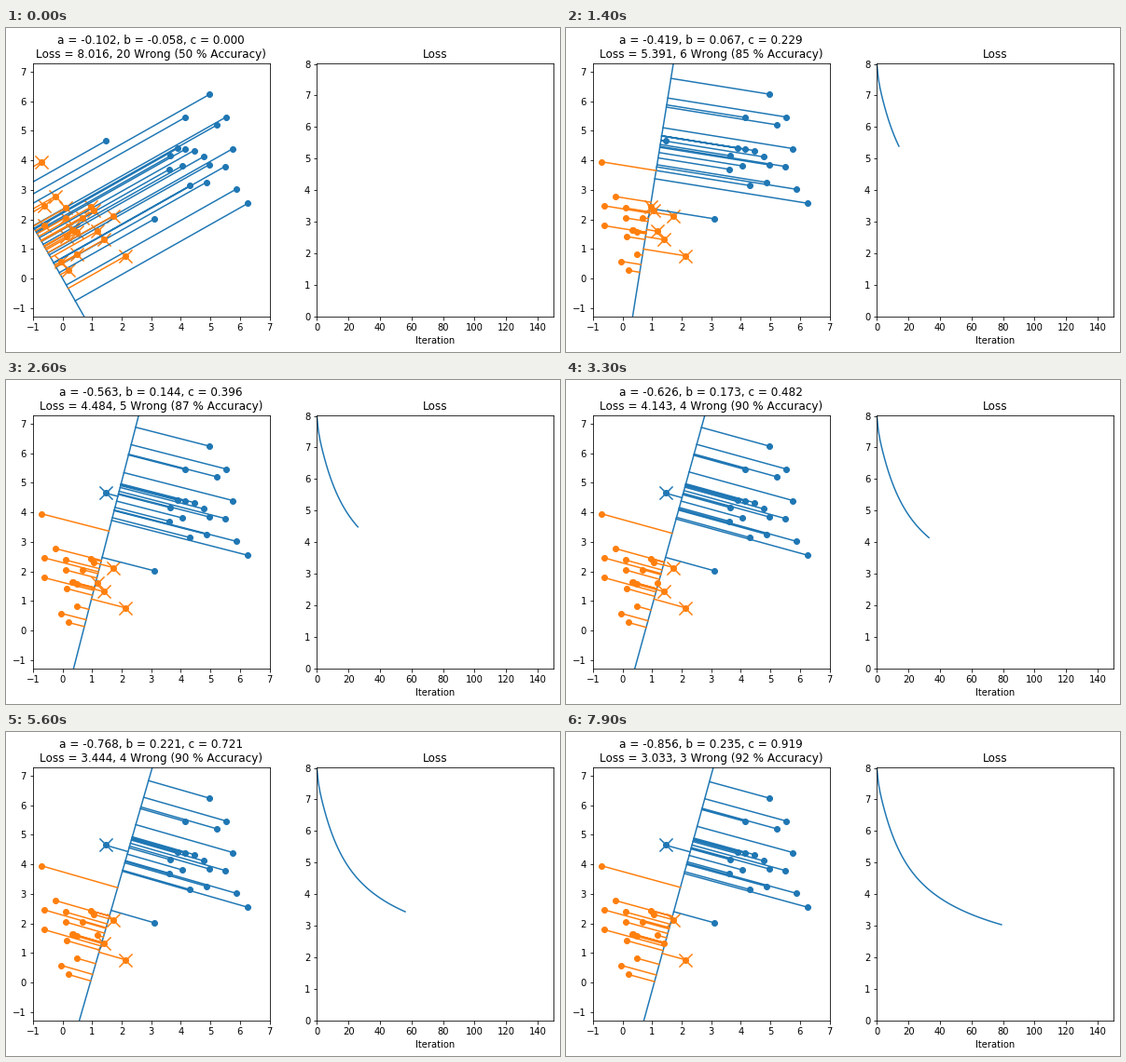
These frames come from a looping animation (594x348 px, 8 s). A matplotlib script:

```python
import numpy as np
import matplotlib.pyplot as plt
from matplotlib.animation import FuncAnimation

W, H, DPI = 594, 348, 72
STEPS, RATE, N = 80, 0.005, 20

plt.rcParams.update({"font.family": "DejaVu Sans", "font.size": 10,
                     "text.kerning_factor": 6})

rng = np.random.RandomState(0)
blue = rng.randn(N, 2) + 4
orange = rng.randn(N, 2) + [1, 2]


def train():
    """Gradient descent on the squared error of a sigmoid unit."""
    X = np.column_stack([np.vstack([blue, orange]), np.ones(2 * N)])
    y = np.repeat([0.0, 1.0], N)
    predict = lambda w: 1 / (1 + np.exp(-X @ w))
    w, states = np.zeros(3), []
    for _ in range(STEPS):
        s = predict(w)
        w = w - RATE * X.T @ (2 * (s - y) * s * (1 - s))
        states.append([*w, np.sum((predict(w) - y) ** 2)])
    return np.array(states)


states = train()
losses = states[:, 3]

fig = plt.figure(figsize=(W / DPI, H / DPI), dpi=DPI, facecolor="white")
AX_W, AX_H, LEFT, BOTTOM = 253.64, 271.8, 28.92, 38.2


def add_axes(left):
    return fig.add_axes([left / W, BOTTOM / H, AX_W / W, AX_H / H])


ax = add_axes(LEFT)
half = 4 * AX_H / AX_W
ax.set(xlim=(-1, 7), ylim=(3 - half, 3 + half),
       xticks=range(-1, 8), yticks=range(-1, 8))
title = ax.set_title("")

ax_loss = add_axes(LEFT + 1.2 * AX_W)
ax_loss.set(xlim=(0, 150), ylim=(0, losses[0]), xticks=range(0, 150, 20),
            yticks=range(9), xlabel="Iteration", title="Loss")
curve, = ax_loss.plot([], [], "C0")

border, = ax.plot([], [], "C0")


class Group:
    """Points of one class, their perpendiculars and error crosses."""

    def __init__(self, pts, color, sign):
        self.pts, self.sign = pts, sign
        self.legs, = ax.plot([], [], color=color)
        ax.plot(*pts.T, "o", color=color)
        self.cross = ax.scatter(*pts.T, s=200, marker="x", color=color)

    def update(self, n, c):
        z = self.pts @ n + c
        feet = self.pts - np.outer(z, n) / (n @ n)
        gap = np.full_like(feet, np.nan)
        self.legs.set_data(*np.stack([self.pts, feet, gap], 1).reshape(-1, 2).T)
        wrong = z * self.sign < 0
        self.cross.set_offsets(self.pts[wrong])
        return wrong.sum()


groups = [Group(blue, "C0", -1), Group(orange, "C1", 1)]
ax.set(xlim=(-1, 7), ylim=(3 - half, 3 + half))


def update(i):
    a, b, c, loss = states[i]
    n = np.array([a, b])
    along = np.array([-b, a]) / np.hypot(a, b)
    base = -c * n / (n @ n)
    border.set_data(*np.array([base - 20 * along, base + 20 * along]).T)
    wrong = sum(g.update(n, c) for g in groups)
    accuracy = 100 * (2 * N - wrong) // (2 * N)
    title.set_text(f"a = {a:.3f}, b = {b:.3f}, c = {c:.3f}\n"
                   f"Loss = {loss:.3f}, {wrong} Wrong ({accuracy} % Accuracy)")
    curve.set_data(np.arange(i + 1), losses[:i + 1])


anim = FuncAnimation(fig, update, frames=STEPS, init_func=lambda: update(0),
                     interval=100, repeat=True, repeat_delay=0)
plt.show()
```
